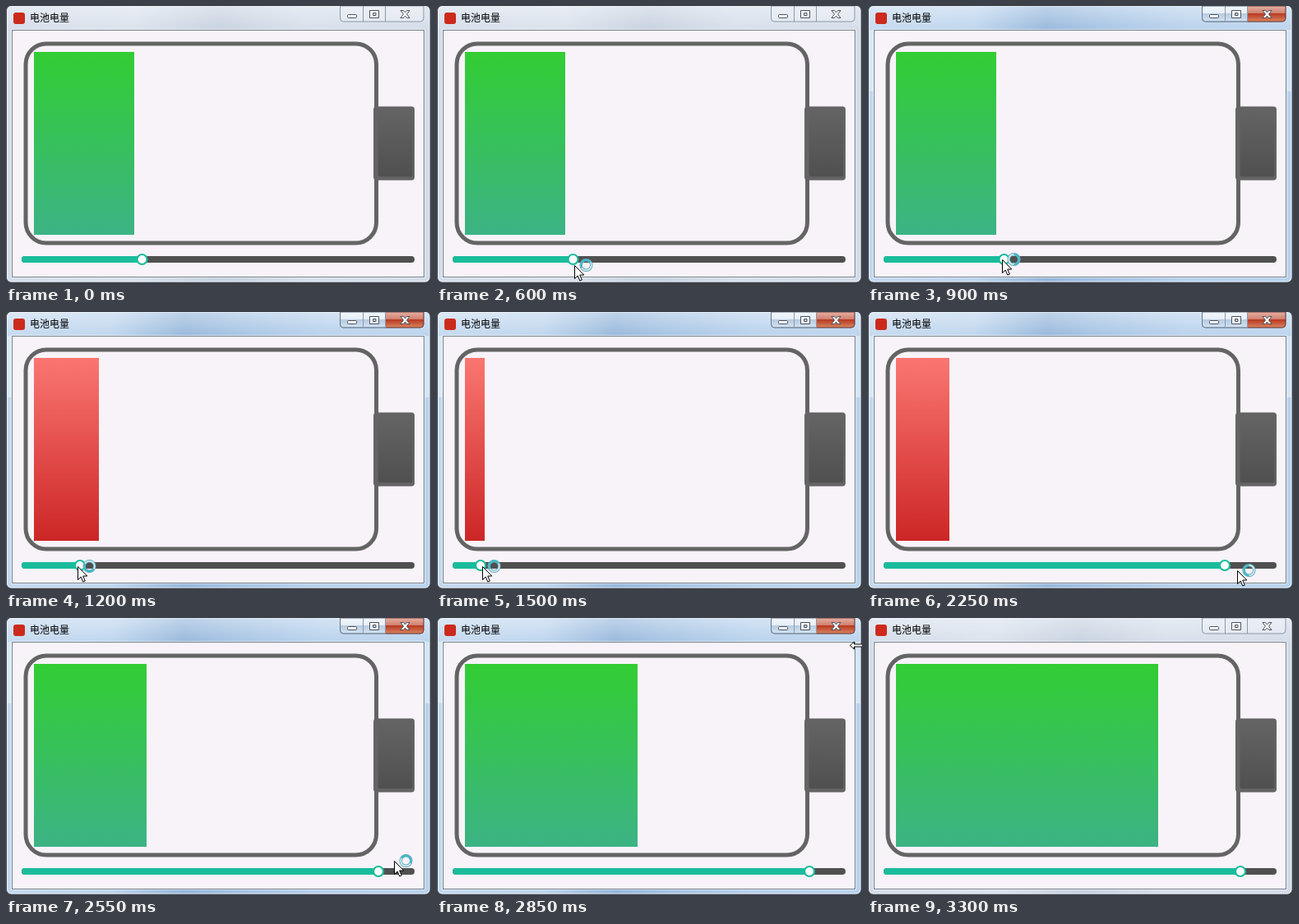
Write an HTML page that moves like this. It is 517 px wide and 339 px high and loops after 3.45 s.

```html
<!DOCTYPE html>
<html lang="zh">
<head>
<meta charset="utf-8">
<title>电池电量</title>
<style>
  html, body { margin: 0; width: 100%; height: 100%; overflow: hidden; background: #3c3f45; }
  svg { display: block; width: 517px; height: 339px; }
  text { font: 12px "Noto Sans CJK SC", "Noto Sans CJK", "Noto Sans", sans-serif; }
  .on { display: none; }
  .active .on { display: inline; }
  .active .off { display: none; }
</style>
</head>
<body>
<svg id="stage" viewBox="0 0 517 339">
  <defs>
    <linearGradient id="glassOff">
      <stop offset="0" stop-color="#d3dce9"/><stop offset=".3" stop-color="#d9e1ec"/>
      <stop offset=".5" stop-color="#c5d0df"/><stop offset=".7" stop-color="#d5deea"/>
      <stop offset="1" stop-color="#d2dbe8"/>
    </linearGradient>
    <linearGradient id="glassOn">
      <stop offset="0" stop-color="#c3d8ef"/><stop offset=".25" stop-color="#bcd4ed"/>
      <stop offset=".42" stop-color="#93b5da"/><stop offset=".55" stop-color="#a3c2e3"/>
      <stop offset=".75" stop-color="#b6d0ec"/><stop offset="1" stop-color="#b8d2ed"/>
    </linearGradient>
    <linearGradient id="sheen" x2="0" y2="1">
      <stop offset="0" stop-color="#fff" stop-opacity=".4"/>
      <stop offset="1" stop-color="#fff" stop-opacity=".05"/>
    </linearGradient>
    <linearGradient id="button" x2="0" y2="1">
      <stop offset="0" stop-color="#fff" stop-opacity=".6"/><stop offset=".48" stop-color="#fff" stop-opacity=".3"/>
      <stop offset=".5" stop-color="#7c98b8" stop-opacity=".35"/><stop offset="1" stop-color="#d5e6f7" stop-opacity=".4"/>
    </linearGradient>
    <linearGradient id="closeRed" x2="0" y2="1">
      <stop offset="0" stop-color="#e5b0a3"/><stop offset=".46" stop-color="#d08070"/>
      <stop offset=".5" stop-color="#b83a22"/><stop offset="1" stop-color="#d88460"/>
    </linearGradient>
    <linearGradient id="low" x2="0" y2="1">
      <stop offset="0" stop-color="#fa7671"/><stop offset="1" stop-color="#cc2626"/>
    </linearGradient>
    <linearGradient id="normal" x2="0" y2="1">
      <stop offset="0" stop-color="#32cd33"/><stop offset="1" stop-color="#3cb385"/>
    </linearGradient>
    <linearGradient id="cap" x2="0" y2="1">
      <stop offset="0" stop-color="#646464"/><stop offset="1" stop-color="#505050"/>
    </linearGradient>
  </defs>

  <!-- window frame -->
  <g stroke="#454d58">
    <rect class="off" x=".5" y="-.5" width="515.5" height="337.5" rx="6" fill="url(#glassOff)"/>
    <rect class="on" x=".5" y="-.5" width="515.5" height="337.5" rx="6" fill="url(#glassOn)"/>
  </g>
  <rect x="2" y="1" width="513" height="28" rx="4" fill="url(#sheen)"/>
  <g class="on" fill="#e3eefa" opacity=".7">
    <rect x="2" y="29" width="5" height="75"/>
    <rect x="510" y="29" width="5" height="75"/>
  </g>
  <rect x="1.5" y=".5" width="513.5" height="335.5" rx="5" fill="none" stroke="#fff" stroke-opacity=".65"/>
  <rect x="6.5" y="28.5" width="503" height="303" fill="none" stroke="#fff" stroke-opacity=".55"/>
  <rect x="7.5" y="29.5" width="501" height="301" fill="#f7f3f8" stroke="#77818d"/>

  <rect x="9" y="8" width="14" height="14" rx="3" fill="#cc2a1c"/>
  <text x="29" y="19">电池电量</text>

  <!-- window buttons -->
  <g stroke="#8d99a8">
    <path d="M406.5 0V15q0 4 4 4H504q4 0 4-4V0Z" fill="#fff" fill-opacity=".25"/>
    <path class="on" d="M406.5 0V15q0 4 4 4H461.500V0Z" fill="url(#button)" stroke="#66788e"/>
    <path class="on" d="M461.500 0V19H504q4 0 4-4V0Z" fill="url(#closeRed)" stroke="#6b3a38"/>
    <path d="M434.500 0V19M461.500 0V19" fill="none"/>
  </g>
  <g fill="#fff" stroke="#4a5260">
    <rect x="415.500" y="10.500" width="11" height="4" rx="1"/>
    <path fill-rule="evenodd" d="M442.500 5.500h11v9h-11zM446.500 8.500h3.500v3h-3.500z"/>
    <path d="M480 5.500h3.500l2 2.500 2-2.500h3.500l-3.500 4.500 3.500 4.500h-3.500l-2-2.500-2 2.500H480l3.500-4.500z"/>
  </g>

  <!-- battery -->
  <rect x="24" y="46" width="426.500" height="243" rx="25" fill="none" stroke="#646464" stroke-width="5"/>
  <rect x="447" y="122.500" width="50" height="90" rx="4" fill="#646464"/>
  <rect x="452.500" y="125" width="42" height="83" rx="2" fill="url(#cap)"/>
  <rect id="charge" x="34" y="56" height="223"/>

  <!-- slider -->
  <rect x="19" y="305" width="478" height="8" rx="4" fill="#505050"/>
  <rect id="track" x="19" y="305" height="8" rx="4" fill="#1abc9c"/>
  <circle id="knob" cy="309" r="6" fill="#fff" stroke="#1abc9c" stroke-width="2.200"/>

  <g id="pointer">
    <path d="M.5.5V16.500L4.200 13 6.800 19 9.300 18 6.700 12H11.800Z" fill="#fff" stroke="#000"/>
    <g transform="translate(14.500 0)" fill="none">
      <circle r="6.300" stroke="#5f9fb0" stroke-width="3.500"/>
      <circle r="6.300" stroke="#c4e8f0" stroke-width="2"/>
      <path id="spinner" d="M0-6.300A6.300 6.300 0 0 1 0 6.300" stroke="#35b8c8" stroke-width="2"/>
    </g>
  </g>
  <path id="resize" d="M502.500 33.500l5-4.500v3h13v-3l5 4.500-5 4.500v-3h-13v3z" fill="#fff" stroke="#000"/>
</svg>

<script>
  const LOOP = 3450, STEP = 150;
  const FULL = 406, RATE = 0.242, ALARM = 0.3 * FULL;
  const $ = id => document.getElementById(id);

  // Each point is [time, value, ...].
  const knobPath = [[1000, 165.5], [1200, 90], [1350, 62], [1500, 53], [1650, 53],
    [1800, 75], [1950, 190], [2100, 330], [2250, 434], [2400, 453]];
  const pointerPath = [[300, 194, 336], [450, 180, 326], [600, 167, 316], [750, 166, 312],
    [900, 163, 309], [1050, 144, 309], [1200, 87, 310], [1500, 54.5, 310], [1650, 54.5, 310],
    [1800, 79, 311], [2100, 343, 314], [2250, 449, 315], [2400, 468, 315],
    [2550, 472, 296], [2700, 488, 150]];

  function along(points, t) {
    const next = points.findIndex(p => p[0] > t);
    if (next === 0) return points[0].slice(1);
    if (next < 0) return points[points.length - 1].slice(1);
    const a = points[next - 1], b = points[next];
    const k = (t - a[0]) / (b[0] - a[0]);
    return a.slice(1).map((v, i) => v + (b[i + 1] - v) * k);
  }

  function chargeWidth(t) {
    const drained = Math.max(24, ALARM - RATE * Math.max(0, t - 1024));
    return Math.round(drained + RATE * Math.max(0, t - 2082));
  }

  function set(id, attrs) {
    for (const name in attrs) $(id).setAttribute(name, attrs[name]);
  }

  function show(id, visible) {
    $(id).style.display = visible ? "" : "none";
  }

  function draw(t) {
    const width = chargeWidth(t);
    set("charge", { width, fill: width > ALARM ? "url(#normal)" : "url(#low)" });

    const [x] = along(knobPath, t);
    set("track", { width: x - 19 });
    set("knob", { cx: x });

    const [px, py] = along(pointerPath, t);
    set("pointer", { transform: `translate(${Math.round(px)} ${Math.round(py)})` });
    set("spinner", { transform: `rotate(${t * 0.4})` });
    show("pointer", t >= 300 && t < 2850);
    show("resize", t >= 2850 && t < 3000);

    $("stage").classList.toggle("active", t >= 900 && t < 3300);
  }

  const start = performance.now();
  function frame() {
    const t = (performance.now() - start) % LOOP;
    draw(Math.floor(t / STEP) * STEP);
    requestAnimationFrame(frame);
  }
  frame();
</script>
</body>
</html>
```
